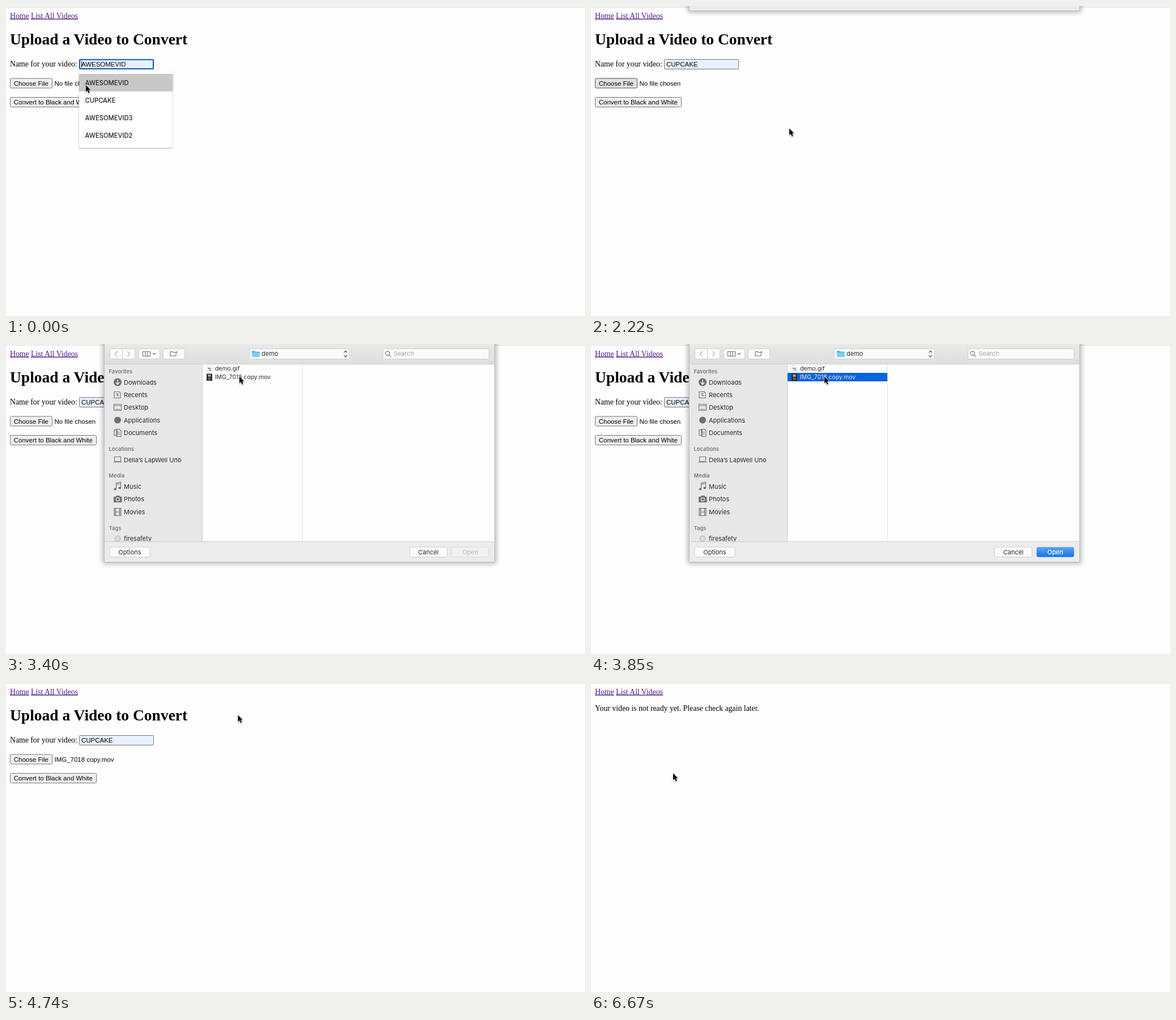
These frames come from a looping animation (1022x548 px, 8 s). An HTML page:

```html
<!DOCTYPE html>
<html lang="en">
<head>
<meta charset="utf-8">
<title>Upload a Video</title>
<style>
html, body { margin: 0; width: 100%; height: 100%; overflow: hidden; background: #fefefe; }
svg { display: block; width: 1022px; height: 548px; }

/* type */
.serif { font: 13.76px "Liberation Serif", serif; }
.serif h1, .title { font: bold 27.5px "Liberation Serif", serif; }
.sans { font: 11.47px "Liberation Sans", sans-serif; }
.ui { font: 11px Inter, sans-serif; fill: #2b2b2b; }
.menu { font: 500 11.2px Inter, sans-serif; fill: #222; }
.head { font: 600 9.4px Inter, sans-serif; fill: #777; }
.file { font-size: 10.4px; }
.mid { text-anchor: middle; }
.link { fill: #551a8b; text-decoration: underline; }

/* controls */
.btn { fill: #efefef; stroke: #767676; }
.ctl { fill: #fbfbfb; stroke: #cfcfcf; }
.line { fill: none; stroke: #707070; stroke-width: 1.1; }
.solid { fill: #707070; }

/* every value holds until its next key */
.a { animation: 8s step-end -10ms infinite; }

.vid { animation-name: vid; }
@keyframes vid { 0% { opacity: 1 } 3.75%, 100% { opacity: 0 } }
.cup { animation-name: cup; }
@keyframes cup { 0% { opacity: 0 } 3.75%, 100% { opacity: 1 } }
.row { animation-name: row; }
@keyframes row { 0% { transform: none } 3.75%, 100% { transform: translateY(31px) } }
.drop { animation-name: drop; }
@keyframes drop { 0% { opacity: 1 } 13%, 100% { opacity: 0 } }
.focus { animation-name: focus; }
@keyframes focus { 0% { opacity: 1 } 24%, 100% { opacity: 0 } }

.choose { animation-name: choose; }
@keyframes choose {
  0%, 29.625%, 100% { fill: #efefef; stroke: #767676 }
  20.375%, 25.875% { fill: #e2e2e2; stroke: #4f4f4f }
  24% { fill: #f5f5f5; stroke: #8d8d8d }
}
.convert { animation-name: convert; }
@keyframes convert {
  0%, 100% { fill: #efefef; stroke: #767676 }
  68.625%, 77.875% { fill: #e2e2e2; stroke: #4f4f4f }
  76% { fill: #f5f5f5; stroke: #8d8d8d }
}

.slide { animation-name: slide; }
@keyframes slide {
  0%, 55.625%, 100% { transform: translateY(-420px) }
  27.75% { transform: translateY(-377px) }
  29.625% { transform: translateY(-90px) }
  31.5% { transform: none }
  53.75% { transform: translateY(-4px) }
}
.panel { animation-name: panel; }
@keyframes panel { 0% { opacity: 1 } 53.75%, 100% { opacity: 0 } }
.picked { animation-name: picked; }
@keyframes picked { 0% { opacity: 0 } 46.25%, 100% { opacity: 1 } }

.none { animation-name: none-yet; }
@keyframes none-yet { 0% { opacity: 1 } 57.5%, 100% { opacity: 0 } }
.chosen { animation-name: chosen; }
@keyframes chosen { 0% { opacity: 0 } 57.5%, 100% { opacity: 1 } }
.form { animation-name: form; }
@keyframes form { 0% { opacity: 1 } 83.375%, 100% { opacity: 0 } }
.done { animation-name: done; }
@keyframes done { 0% { opacity: 0 } 83.375%, 100% { opacity: 1 } }

.cursor { animation-name: cursor; filter: drop-shadow(0 1px 1px rgba(0, 0, 0, .35)); }
@keyframes cursor {
  0% { transform: translate(141px, 140px) }
  1.875% { transform: translate(142px, 144px) }
  3.75% { transform: translate(145px, 153px) }
  5.5% { transform: translate(148px, 160px) }
  11.125% { transform: translate(147.5px, 159px) }
  14.875% { transform: translate(141px, 158px) }
  16.625% { transform: translate(122px, 152px) }
  18.5% { transform: translate(98px, 145px) }
  20.375% { transform: translate(78px, 138px) }
  22.25% { transform: translate(66px, 134px) }
  24% { transform: translate(64px, 133px) }
  25.875% { transform: translate(150px, 160px) }
  27.75% { transform: translate(350px, 216.5px) }
  29.625% { transform: translate(388px, 150px) }
  31.5% { transform: translate(408px, 104px) }
  33.375% { transform: translate(415px, 82px) }
  35.125% { transform: translate(417px, 74px) }
  37% { transform: translate(417px, 71px) }
  38.875% { transform: translate(417px, 69px) }
  40.625% { transform: translate(414px, 62px) }
  42.5% { transform: translate(412px, 57.5px) }
  59.25% { transform: translate(409.5px, 58.5px) }
  61.125% { transform: translate(380px, 68px) }
  63% { transform: translate(310px, 95px) }
  64.875% { transform: translate(220px, 135px) }
  66.75% { transform: translate(160px, 161px) }
  68.625% { transform: translate(151px, 162px) }
  70.375% { transform: translate(147px, 162px) }
  72.25%, 100% { transform: translate(145px, 161.5px) }
}
</style>
</head>
<body>
<svg viewBox="0 0 1022 548">
  <defs>
    <linearGradient id="bar" x2="0" y2="1">
      <stop stop-color="#e9e9e9"/><stop offset="1" stop-color="#dedede"/>
    </linearGradient>
    <linearGradient id="blue" x2="0" y2="1">
      <stop stop-color="#5aa7f8"/><stop offset="1" stop-color="#1472ee"/>
    </linearGradient>
    <filter id="soft" x="-5%" y="-5%" width="110%" height="110%"><feGaussianBlur stdDeviation="4"/></filter>
    <filter id="lift" x="-5%" y="-5%" width="110%" height="110%"><feDropShadow dx="0" dy="1" stdDeviation="1.3" flood-opacity=".38"/></filter>
    <clipPath id="outside"><path clip-rule="evenodd" d="M150-40H890V430H150ZM174-40H862V385H174Z"/></clipPath>
    <clipPath id="side"><path d="M174 36H346V349H174Z"/></clipPath>
  </defs>

  <rect width="1022" height="548" fill="#fefefe"/>
  <path d="M0 1.9H1022" stroke="#d8d8d8" stroke-width="1.2"/>

  <g class="serif">
    <text class="link" x="7" y="21.5">Home</text>
    <text class="link" x="44" y="21.5">List All Videos</text>
    <text class="a done" x="7" y="51.3">Your video is not ready yet. Please check again later.</text>
  </g>

  <g class="a form">
    <text class="title" x="7" y="68">Upload a Video to Convert</text>
    <text class="serif" x="7" y="107">Name for your video:</text>
    <g class="sans">
      <rect x="129.5" y="94.5" width="131" height="17" rx="1" fill="#e8f0fe" stroke="#767676"/>
      <rect class="a focus" x="130" y="94.7" width="130" height="16.4" rx="1.5" fill="#e8f0fe" stroke="#1059c0" stroke-width="2"/>
      <text class="a vid" x="133" y="107">AWESOMEVID</text>
      <text class="a cup" x="133" y="107">CUPCAKE</text>
      <path class="a drop" d="M133.5 97V109" stroke="#222"/>

      <rect class="btn a choose" x="7.5" y="128" width="74" height="17" rx="2"/>
      <text x="13.8" y="140.5">Choose File</text>
      <text class="a none" x="85.5" y="140.5">No file chosen</text>
      <text class="a chosen" x="85.5" y="140.5">IMG_7018 copy.mov</text>

      <rect class="btn a convert" x="7.5" y="161.5" width="152" height="17" rx="2"/>
      <text x="13.8" y="174">Convert to Black and White</text>
    </g>

    <g class="a drop menu">
      <rect x="129" y="113" width="165.5" height="137.5" rx="3" fill="#fff" filter="url(#lift)"/>
      <rect class="a row" x="129" y="120" width="165.5" height="31" fill="#c8c8c8"/>
      <text x="139.5" y="139.6">AWESOMEVID</text>
      <text x="139.5" y="170.6">CUPCAKE</text>
      <text x="139.5" y="201.6">AWESOMEVID3</text>
      <text x="139.5" y="232.6">AWESOMEVID2</text>
    </g>
  </g>

  <g class="a slide">
    <g clip-path="url(#outside)">
      <rect x="170" y="-30" width="696" height="419" rx="5" opacity=".26" filter="url(#soft)"/>
    </g>
    <path d="M173.5-30V385.5H862.5V-30" fill="none" stroke="#bdbdbd"/>

    <g class="a panel ui">
      <path d="M174-40H862V385H174Z" fill="#ececec"/>
      <path d="M174 0H862V36H174Z" fill="url(#bar)"/>
      <path d="M174 36H346V349H174Z" fill="#e8e8e8"/>
      <path d="M347 36H862V349H347Z" fill="#fefefe"/>
      <path d="M174 35.5H862M174 349.5H862M346.5 36V349" stroke="#cdcdcd"/>
      <path d="M523.5 36V349" stroke="#e0e0e0"/>

      <g class="ctl">
        <rect x="183.5" y="8.5" width="44" height="18" rx="3"/>
        <rect x="234.5" y="8.5" width="37" height="18" rx="3"/>
        <rect x="277.5" y="8.5" width="38" height="18" rx="3"/>
        <rect x="429.5" y="8.5" width="177" height="18" rx="3"/>
        <rect x="665.5" y="8.5" width="187" height="18" rx="3"/>
        <path d="M205.5 9V26"/>
      </g>
      <path class="line" style="stroke:#a2a2a2" d="M196.500 13l-4 4.500 4 4.500M214.500 13l4 4.500-4 4.500"/>
      <path class="line" d="M241.500 13.500h13v8h-13zM246 13.500v8M250 13.500v8M259 16l2.500 2.500 2.500-2.500M290 13.500h4l1.500 1.500h4M290 13.500v7.500h10v-4M300.500 12.500v4M298.500 14.500h4"/>
      <path d="M434 12h5l1.500 1.500h7V23H434Z" fill="#58b9ea"/>
      <path d="M434 15.500h13.500V23H434Z" fill="#79cff5"/>
      <text x="451" y="21.3">demo</text>
      <path class="line" style="stroke:#444" d="M596.500 15l2.800-3 2.800 3M596.500 20l2.800 3 2.800-3"/>
      <circle class="line" cx="673.500" cy="16.500" r="3.600"/>
      <path class="line" d="M676 19.200l3.500 3.500"/>
      <text x="684" y="21.300" fill="#a3a3a3">Search</text>

      <g clip-path="url(#side)">
        <g class="head">
          <text x="181.500" y="51.700">Favorites</text>
          <text x="181.500" y="188.700">Locations</text>
          <text x="181.500" y="236">Media</text>
          <text x="181.500" y="328.500">Tags</text>
        </g>
        <circle class="solid" cx="197" cy="67.500" r="7"/>
        <path d="M197 63v8M193.700 68l3.300 3.500 3.300-3.500" fill="none" stroke="#eee" stroke-width="1.500"/>
        <path class="line" d="M191 84.500h9l2 2v9h-11zM194 88h5M196.500 87.500v4h3"/>
        <path class="line" d="M190.500 106.500h13v11h-13zM190.500 109h13M192.500 115.500h9"/>
        <circle class="solid" cx="197" cy="134.500" r="6"/>
        <path class="line" d="M191 151.500h5v10h-5zM195 150.500h5l3 3v10h-8zM197 156h4M197 159h4"/>
        <path class="line" d="M191.500 199.500h11v8h-11zM189.500 209h15"/>
        <path class="line" d="M194.500 256v-10l8-2v10M194.500 248.500l8-2"/>
        <ellipse class="solid" cx="192.700" cy="256.500" rx="2.300" ry="1.900"/>
        <ellipse class="solid" cx="200.700" cy="254.500" rx="2.300" ry="1.900"/>
        <path class="solid" d="M190 270h3.500l1.500-2h5l1.500 2h3v10H190Z"/>
        <circle cx="197.300" cy="274.700" r="3" fill="none" stroke="#e8e8e8" stroke-width="1.200"/>
        <path class="line" d="M191 290.500h12v13h-12zM193.700 290.500v13M200.300 290.500v13M193.700 297h6.600"/>
        <path class="line" stroke-dasharray="1.500 1.500" d="M192.300 291v12M201.700 291v12"/>
        <circle cx="197" cy="344" r="4.800" fill="#dcdcdc" stroke="#aaa"/>
        <text x="208" y="71.500">Downloads</text>
        <text x="208" y="94">Recents</text>
        <text x="208" y="116.300">Desktop</text>
        <text x="208" y="138.700">Applications</text>
        <text x="208" y="161">Documents</text>
        <text x="208" y="208.500">Della’s LapWell Uno</text>
        <text x="208" y="256">Music</text>
        <text x="208" y="278.300">Photos</text>
        <text x="208" y="300.700">Movies</text>
        <text x="208" y="348">firesafety</text>
      </g>

      <path class="a picked" d="M347 51H523V66H347Z" fill="#0a63e0"/>
      <path d="M355 38h6l3 3v8h-9z" fill="#fff" stroke="#d0d0d0" stroke-width=".7"/>
      <path d="M356.500 42h5v2h-5zM358 45.500h5v1.500h-5z" fill="#6d8296"/>
      <path d="M354 52.500h10V65H354Z" fill="#2c2926"/>
      <path d="M356.500 54h5v4h-5z" fill="#b9a58c"/>
      <path d="M356.500 59.500h5v4h-5z" fill="#75604c"/>
      <g class="file">
        <text x="369" y="46.800">demo.gif</text>
        <text x="369" y="62.300">IMG_7018 copy.mov</text>
        <text class="a picked" x="369" y="62.300" fill="#fff">IMG_7018 copy.mov</text>
      </g>

      <g class="ctl">
        <rect x="183" y="359" width="71" height="17.500" rx="3"/>
        <rect x="712.500" y="359" width="66" height="17.500" rx="3"/>
        <rect x="786.500" y="359" width="66" height="17.500" rx="3" style="fill:#f1f1f1;stroke:#d8d8d8"/>
      </g>
      <rect class="a picked" x="786.500" y="359" width="66" height="17.500" rx="3" fill="url(#blue)"/>
      <g class="mid">
        <text x="218.500" y="371.700">Options</text>
        <text x="745.500" y="371.700">Cancel</text>
        <text x="819.500" y="371.700" fill="#b5b5b5">Open</text>
        <text class="a picked" x="819.500" y="371.700" fill="#fff">Open</text>
      </g>
    </g>
  </g>

  <g class="a cursor">
    <path d="M0 0V11.700L2.700 9.200 4.700 13.900 6.700 13 4.700 8.500H8.400Z" stroke="#fff" stroke-width="1.300" paint-order="stroke"/>
  </g>
</svg>
</body>
</html>
```
